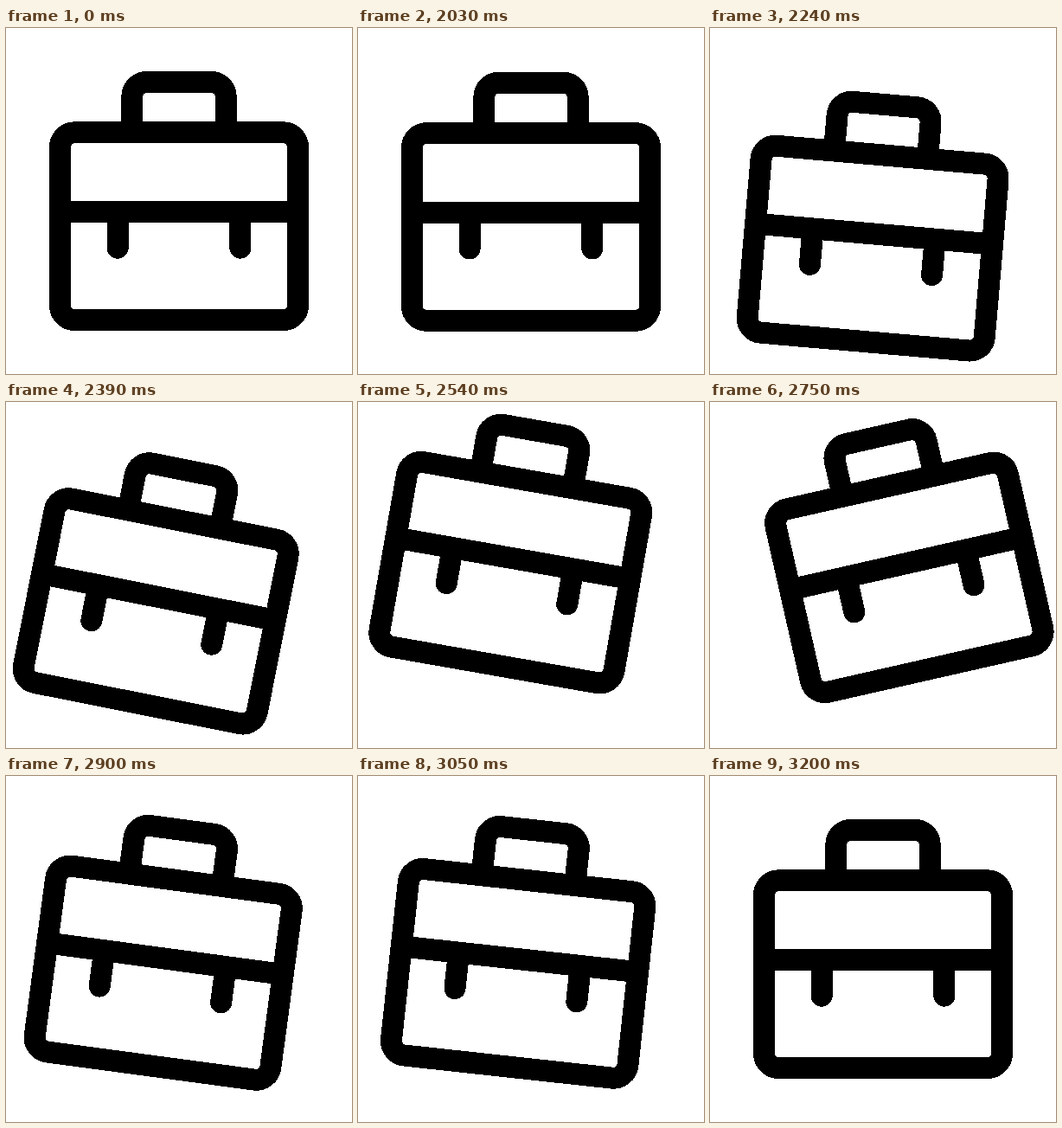
An HTML page for the animation above (3.23 s loop, 400x400 px).

```html
<!DOCTYPE html>
<html lang="en">
<head>
<meta charset="utf-8">
<title>Briefcase</title>
<style>
  html, body { margin: 0; height: 100%; overflow: hidden; background: #fff; }
  svg { display: block; width: 100%; height: 100%; }
</style>
</head>
<body>
<svg viewBox="0 0 48 48" shape-rendering="crispEdges">
  <g id="case" fill="none" stroke="#000" stroke-width="3">
    <rect x="7.5" y="14.5" width="33" height="26" rx="2"/>
    <path d="M17.5 14.5v-5a2 2 0 0 1 2-2h9a2 2 0 0 1 2 2v5M7.5 25.5h33"/>
    <path d="M15.5 25.5v5M32.5 25.5v5" stroke-linecap="round"/>
  </g>
</svg>
<script>
const LOOP = 3230, START = 2000, STEP = 30, UNIT = 400 / 48;
const briefcase = document.getElementById('case');

// Keys are [step, value]; lift is in stage pixels, swing in degrees.
const lift = [[0, 0], [10, 29], [20.5, -39.8], [30.5, 0]];
const swing = [[2, 0], [16.3, 13], [24.3, -13.4], [31.4, 10], [40, 0]];

function valueAt(keys, step) {
  const next = keys.findIndex(([time]) => time > step);
  if (next < 1) return 0;
  const [t0, v0] = keys[next - 1], [t1, v1] = keys[next];
  const u = (step - t0) / (t1 - t0);
  return v0 + (v1 - v0) * u * u * (3 - 2 * u);
}

function draw(now) {
  const step = Math.max(0, Math.floor((now % LOOP - START) / STEP));
  const y = valueAt(lift, step) / UNIT;
  briefcase.setAttribute('transform', `translate(0 ${y}) rotate(${valueAt(swing, step)} 24 11)`);
}

const origin = performance.now();
function tick() {
  draw(performance.now() - origin);
  requestAnimationFrame(tick);
}
tick();
</script>
</body>
</html>
```
